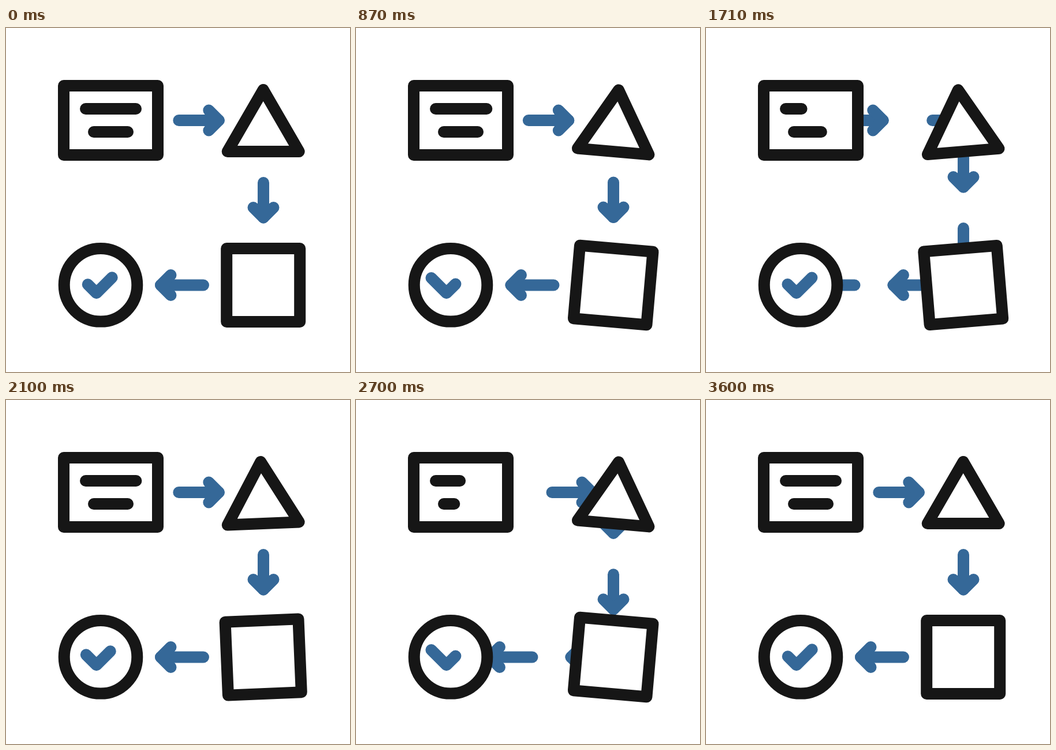
Write an HTML page with a canvas that moves like this. It is 596x596 px and loops after 3930 ms.

```html
<!DOCTYPE html>
<html lang="en">
<head>
<meta charset="utf-8">
<title>Process flow</title>
<style>
  html, body { margin: 0; width: 100%; height: 100%; overflow: hidden; background: #fff; }
  canvas { display: block; }
</style>
</head>
<body>
<canvas id="stage" width="596" height="596"></canvas>
<script>
const ctx = document.getElementById('stage').getContext('2d');
const INK = '#161616', BLUE = '#356898';
const LOOP = 3930, STEP = 30, LAST = 120;
const HALF = 30;   // steps in one swing
const BEAT = 40;   // steps from one arrow launch to the next

function ease(t) {
  t = Math.min(1, Math.max(0, t));
  return t * t * (3 - 2 * t);
}

// Eased 0 → 1 → 0 … turning every HALF steps
function wave(n) {
  const t = n / HALF % 2;
  return ease(t < 1 ? t : 2 - t);
}

function line(color, ...points) {
  ctx.beginPath();
  points.forEach(([x, y]) => ctx.lineTo(x, y));
  ctx.strokeStyle = color;
  ctx.stroke();
}

function outline(build) {
  ctx.beginPath();
  build();
  ctx.closePath();
  ctx.fill();
  ctx.strokeStyle = INK;
  ctx.stroke();
}

function placed(x, y, angle, paint) {
  ctx.save();
  ctx.translate(x, y);
  ctx.rotate(angle);
  paint();
  ctx.restore();
}

// An arrow and its follower, cut off once inside the next shape
function arrows(x, y, angle, length, gap, travel) {
  placed(x, y, angle, () => {
    ctx.beginPath();
    ctx.rect(-gap, -40, 2 * gap, 80);
    ctx.clip();
    for (const shift of [travel * gap, (travel - 1) * gap]) {
      const tip = shift + length, wing = 17.5;
      line(BLUE, [shift, 0], [tip, 0]);
      line(BLUE, [tip - wing, -wing], [tip, 0], [tip - wing, wing]);
    }
  });
}

// A text bar that shrinks, grows past its full width, then settles
function bar(x, y, width, dip, extra, time) {
  const end = x + width
    - dip * ease(time / 12)
    + (dip + extra) * ease((time - 12) / 8)
    - extra * ease((time - 20) / 8);
  line(INK, [x, y], [end, y]);
}

function draw(n) {
  const beat = n % BEAT;
  const travel = ease(beat / HALF) % 1;
  const swing = wave(n);
  const middle = Math.abs(n - LAST / 2) < HALF;
  const tilt = (middle ? 10 * swing - 5 : 5 * swing) * Math.PI / 180;

  ctx.clearRect(0, 0, 596, 596);
  ctx.lineWidth = 20;
  ctx.lineCap = ctx.lineJoin = 'round';
  ctx.fillStyle = '#fff';

  arrows(299.3, 160, 0, 69.5, 155, travel);
  arrows(446, 268, Math.PI / 2, 60.5, 132, travel);
  arrows(342, 445.5, Math.PI, 74, 141, travel);

  outline(() => ctx.rect(100, 100, 163, 120));
  bar(138, 140, 87, 72, 8.5, beat - 3);
  bar(152, 180, 59, 44, 4, beat);

  placed(445.7, 214, tilt, () => outline(() => {
    ctx.moveTo(0, -107);
    ctx.lineTo(62, 0);
    ctx.lineTo(-62, 0);
  }));
  placed(445.7, 445.5, tilt, () => outline(() => ctx.rect(-63.5, -63.5, 127, 127)));
  outline(() => ctx.arc(164, 445.3, 63.3, 0, 2 * Math.PI));

  // The tick slides along its own bend
  placed(156.7, 459.3, 0, () => {
    const left = 15 + 11.3 * swing, right = 42 - left;
    line(BLUE, [-left, -left], [0, 0], [right, -right]);
  });
}

function frame() {
  const time = performance.now() % LOOP;
  draw(Math.min(LAST, Math.floor(time / STEP)));
  requestAnimationFrame(frame);
}
frame();
</script>
</body>
</html>
```
